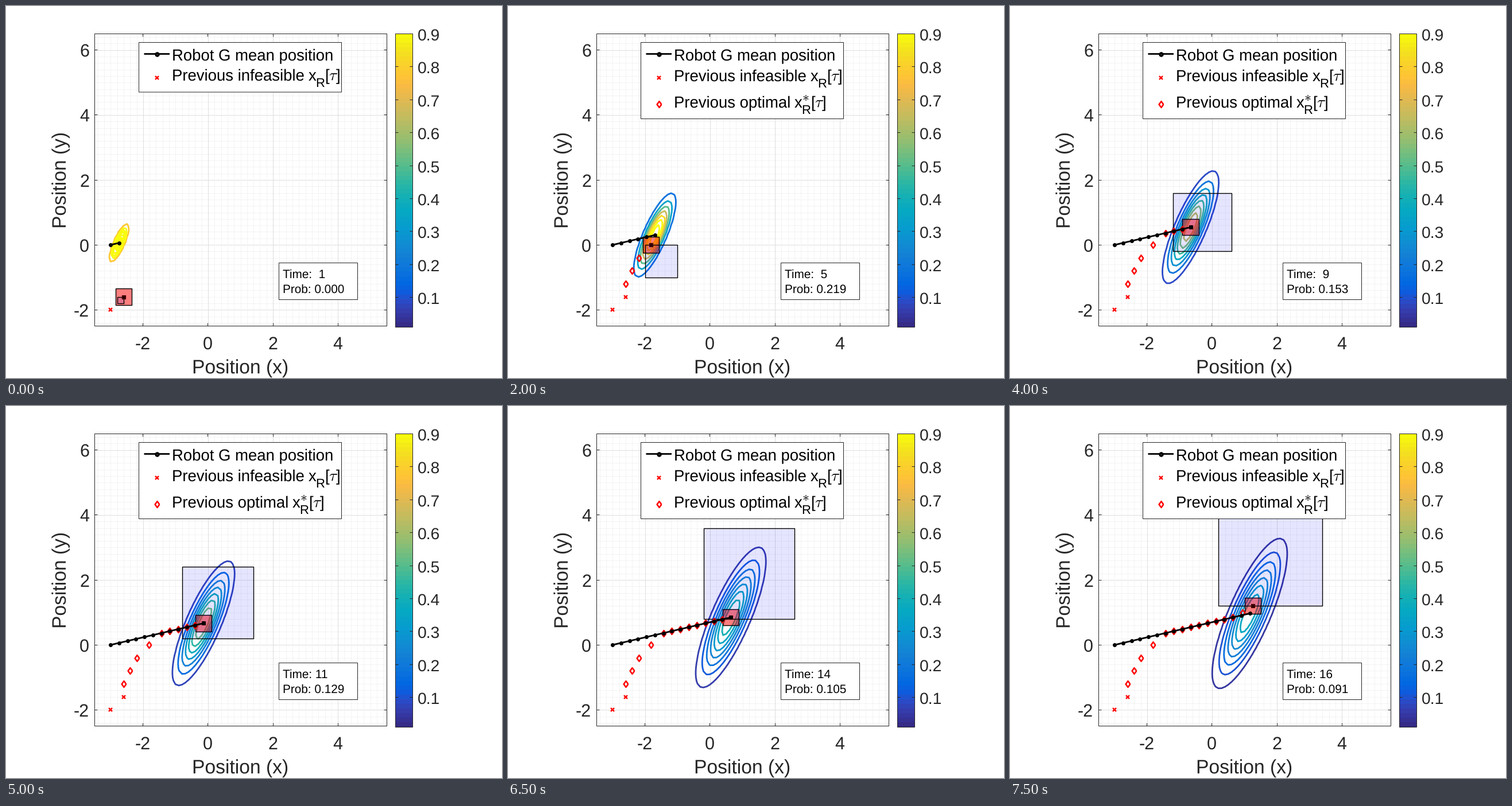
A matplotlib script for the animation above (8 s loop, 864 by 648 pixels).

```python
import numpy as np
import matplotlib.pyplot as plt
from matplotlib.animation import FuncAnimation
from matplotlib.colors import LinearSegmentedColormap
from matplotlib.patches import Rectangle

plt.rcParams.update({"font.family": "Liberation Sans", "mathtext.fontset": "cm",
                     "text.hinting": "none"})

W, H = 864, 648
STEPS = 16
DARK = (0.15, 0.15, 0.15)
LEFT, TOP, SIDE = 154, 48.5, 509
LO_X, LO_Y, SPAN = -3.5, -2.5, 9
DIAMOND = [(0.72, 0), (0, 1), (-0.72, 0), (0, -1), (0.72, 0)]
HIT = dict(marker=DIAMOND, ms=10.8, mew=2.5, mec="red", mfc="none")
MISS = dict(marker="x", color="red", ms=6, mew=2.4)

# (position out of 63, r, g, b)
STOPS = [
    (0, .208, .166, .529), (3, .208, .239, .677), (5, .171, .292, .779),
    (7, .059, .360, .868), (9, .006, .409, .883), (12, .050, .459, .864),
    (15, .078, .504, .838), (18, .064, .557, .824), (21, .027, .614, .814),
    (25, .027, .664, .761), (28, .084, .693, .706), (31, .180, .718, .642),
    (35, .348, .742, .547), (40, .571, .749, .449), (45, .753, .738, .377),
    (49, .882, .727, .322), (52, .974, .731, .267), (54, .999, .765, .216),
    (58, .970, .848, .148), (60, .959, .895, .113), (63, .976, .983, .054),
]
CMAP = LinearSegmentedColormap.from_list(
    "bluegold", [(s[0] / 63, s[1:]) for s in STOPS], N=64)


def mean(t):
    return np.array([-3 + 0.26 * t, 0.0605 * t])


def density(x, y, t):
    """Gaussian with covariance t * [[.02, .032], [.032, .08]]."""
    mx, my = mean(t)
    dx, dy = x - mx, y - my
    det = 0.000576 * t * t
    q = (0.08 * dx**2 - 0.064 * dx * dy + 0.02 * dy**2) * t / det
    return np.exp(-q / 2) / (2 * np.pi * np.sqrt(det))


def reach(t):
    """Lower-left corner and side of the reachable square."""
    return -3 + 0.2 * t, -2 + 0.2 * t, 0.2 * t


def chaser(t):
    """Most likely meeting point inside the reachable square."""
    x0, y0, s = reach(t)
    if t < 2:
        return x0 + s, y0 + s
    mx, my = mean(t)
    y = np.clip(my, y0, y0 + s)
    return np.clip(mx + 0.4 * (y - my), x0, x0 + s), y


def catch_prob(t):
    d = (np.arange(25) + 0.5) / 50 - 0.25
    cx, cy = chaser(t)
    gx, gy = np.meshgrid(cx + d, cy + d)
    return density(gx, gy, t).mean() * 0.25


fig = plt.figure(figsize=(W / 72, H / 72), dpi=72, facecolor="white")
ax = fig.add_axes([LEFT / W, 1 - (TOP + SIDE) / H, SIDE / W, SIDE / H])
ax.set(xlim=(LO_X, LO_X + SPAN), ylim=(LO_Y, LO_Y + SPAN), xticks=[], yticks=[])
ax.spines[:].set_visible(False)

# Pixel-space layer for labels, legend and colour bar
ui = fig.add_axes([0, 0, 1, 1], zorder=2)
ui.set(xlim=(0, W), ylim=(H, 0))
ui.axis("off")


def label(x, y, s, size, color="black", **kw):
    return ui.text(x, y, s, fontsize=size, color=color, va="baseline", **kw)


def stroke(xs, ys):
    ui.plot(xs, ys, color=DARK, lw=1, snap=False, solid_capstyle="butt")


def box(x, y, w, h, fc="white"):
    return ui.add_patch(Rectangle((x, y), w, h, fc=fc, ec=DARK, lw=1, snap=False))


def centre(v):
    """Middle of the pixel that holds v."""
    return np.floor(v) + 0.5


def draw_axes():
    scale = SIDE / SPAN
    for v in np.arange(-3.4, 5.5, 0.2):
        ax.axvline(v, color="0.84", lw=0.8, ls=(0, (1, 2)), zorder=0)
    for v in np.arange(-2.4, 6.5, 0.2):
        ax.axhline(v, color="0.84", lw=0.8, ls=(0, (1, 2)), zorder=0)
    right, bottom = LEFT + SIDE, TOP + SIDE
    for v in range(-2, 7, 2):
        y = centre(bottom - (v - LO_Y) * scale)
        ax.axhline(v, color="0.87", lw=1, zorder=1)
        stroke([LEFT, LEFT + 5.5], [y, y])
        stroke([right - 4.5, right], [y, y])
        label(145, y + 11.5, f"{v}", 30.5, DARK, ha="right")
        if v > 4:
            continue
        x = centre(LEFT + (v - LO_X) * scale)
        ax.axvline(v, color="0.87", lw=1, zorder=1)
        stroke([x, x], [TOP, TOP + 5])
        stroke([x, x], [bottom - 5, bottom])
        label(x - 0.5, 598, f"{v}", 30.5, DARK, ha="center")
    box(LEFT + 0.5, TOP, SIDE, SIDE, fc="none")
    label(408.5, 640, "Position (x)", 33.6, DARK, ha="center")
    label(105, 302.5, "Position (y)", 33.6, DARK, ha="center",
          rotation=90, rotation_mode="anchor")


def draw_colorbar():
    x0, x1, y0, y1 = 678.5, 708.5, 48.5, 559.5
    ui.imshow(np.linspace(0.9, 0.01, 64)[:, None], cmap=CMAP, vmin=0.01, vmax=0.9,
              extent=(x0, x1, y1, y0), aspect="auto", interpolation="nearest")
    ui.set(xlim=(0, W), ylim=(H, 0))
    box(x0, y0, x1 - x0, y1 - y0, fc="none")
    for k in range(1, 10):
        y = centre(y0 + (0.9 - k / 10) * (y1 - y0) / 0.89)
        stroke([x0, x0 + 5], [y, y])
        stroke([x1 - 5, x1], [y, y])
        label(717, y + 11, f"0.{k}", 28.2, DARK)


def symbol(x, y):
    """x with subscript R and [tau]; returns its text pieces."""
    return [label(x, y, "x", 27.5), label(x + 13, y + 11, "R", 22),
            label(x + 28.5, y, "[", 27.5), label(x + 36, y, r"$\tau$", 27.5),
            label(x + 48, y, "]", 27.5)]


def draw_legend():
    """Fixed rows; returns the frame, the shifting row and the late row."""
    frame = box(231.5, 63.5, 353, 86.5)
    ui.plot([240.5, 285], [83.5, 83.5], color="black", lw=2.8, snap=False,
            solid_capstyle="butt")
    ui.plot(262.5, 83.5, "o", color="black", ms=7.5)
    ui.plot(262.5, 83.5, "o", color="0.3", ms=2, mew=0)
    label(289, 95, "Robot G mean position", 27.5)
    ui.plot(262.5, 124.5, **MISS)
    mid = [label(289, 130, "Previous infeasible", 27.5)] + symbol(526.5, 130)
    late = [label(289, 177, "Previous optimal", 27.5),
            label(512, 165, r"$\ast$", 24)] + symbol(498.5, 177)
    late += ui.plot(262.5, 171, **HIT)
    return frame, mid, late


draw_axes()
draw_colorbar()
frame, mid_row, late_row = draw_legend()
mid_base = [a.get_position() for a in mid_row]
box(475.5, 447.5, 137, 64)
time_text = label(482.5, 473.5, "", 20.8)
prob_text = label(482.5, 500, "", 20.8)

robot = ax.add_patch(Rectangle((0, 0), 0.5, 0.5, fc=(1, 0, 0, 0.5), ec="black",
                               lw=1.4, zorder=4))
area = ax.add_patch(Rectangle((0, 0), 1, 1, fc=(0, 0, 1, 0.1), ec="black",
                              lw=1.4, zorder=4.5))
spot, = ax.plot([], [], "s", ms=5, mfc="#200000", mec="#400000", mew=2.2, zorder=5)
misses, = ax.plot([], [], ls="none", zorder=6, **MISS)
hits, = ax.plot([], [], ls="none", zorder=6, **HIT)
trail, = ax.plot([], [], "-o", color="black", lw=2.8, ms=7, mew=0, zorder=7)

GX, GY = np.meshgrid(np.linspace(-3.5, 5.5, 91), np.linspace(-2.5, 6.5, 91))
past = np.array([chaser(t) for t in range(STEPS + 1)])
rings = []


def update(i):
    t = i + 1
    while rings:
        rings.pop().remove()
    z = density(GX, GY, t)
    rings.append(ax.contour(GX, GY, z, levels=z.max() * np.arange(1, 8) / 8,
                            cmap=CMAP, vmin=0.01, vmax=0.9, linewidths=2.8, zorder=3))

    x0, y0, s = reach(t)
    area.set_bounds(x0, y0, s, s)
    cx, cy = past[t]
    robot.set_xy((cx - 0.25, cy - 0.25))
    spot.set_data([cx], [cy])
    misses.set_data(*past[:min(t, 2)].T)
    hits.set_data(*past[2:max(t, 2)].T)
    trail.set_data(*mean(np.arange(t + 1)))

    full = t > 2
    frame.set_height(133 if full else 86.5)
    for a, (x, y) in zip(mid_row, mid_base):
        a.set_position((x, y + full))
    for a in late_row:
        a.set_visible(full)
    time_text.set_text(f"Time: {t:2d}")
    prob_text.set_text(f"Prob: {catch_prob(t):.3f}")
    return []


anim = FuncAnimation(fig, update, frames=STEPS, interval=500, repeat=True,
                     repeat_delay=0, blit=False)
plt.show()
```
